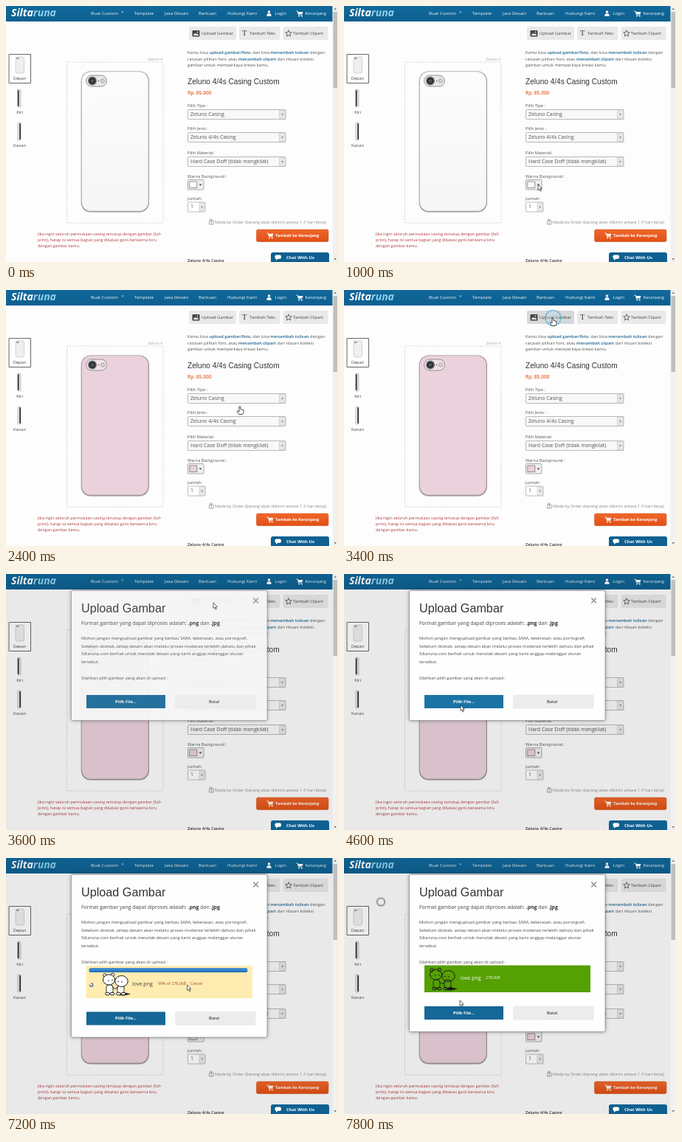
These frames come from a looping animation (450 by 347 pixels, 8000 ms). An HTML page with a canvas:

```html
<!DOCTYPE html>
<html lang="id">
<head>
<meta charset="utf-8">
<title>Casing Custom</title>
<style>
html, body { margin: 0; width: 100%; height: 100%; overflow: hidden; background: #fdfdfd; }
canvas { display: block; width: 450px; height: 347px; }
</style>
</head>
<body>
<canvas id="stage"></canvas>
<script>
const W = 450, H = 347, LOOP = 8000, STEP = 200;
const SANS = '"Open Sans", sans-serif', ARIAL = '"Liberation Sans", Arial, sans-serif';
const canvas = document.getElementById('stage');
const c = canvas.getContext('2d');
const dpr = window.devicePixelRatio || 1;
canvas.width = W * dpr;
canvas.height = H * dpr;

const PINK = '#ead1dc';
const PALETTE = [
  '000 444 666 999 ccc eee f3f3f3 fff',
  'f02020 ff9933 ffbf33 35a835 3cb4c4 4585d8 6a48b0 9a48bc',
  'f4cccc fce5cd fff2cc d9ead3 d0e0e3 cfe2f3 d9d2e9 ead1dc',
  'ea9999 f9cb9c ffe599 b6d7a8 a2c4c9 9fc5e8 b4a7d6 d5a6bd',
  'e06666 f6b26b ffd966 93c47d 76a5af 6fa8dc 8e7cc3 c27ba0',
  'cc0000 e69138 f1c232 6aa84f 45818e 3d85c6 674ea7 a64d79',
  '990000 b45f06 bf9000 38761d 134f5c 0b5394 351c75 741b47',
  '660000 783f04 7f6000 274e13 0c343d 073763 20124d 4c1130'
].map(row => row.split(' ').map(hex => '#' + hex));

// Pointer path: time, x, y of the tip
const PATH = [
  [200, 330, 300], [1000, 263, 242], [1400, 263, 242], [2000, 317, 158], [2400, 317, 158],
  [3200, 283, 38], [3400, 283, 38], [3600, 281, 39], [3800, 270, 60], [4600, 158, 178],
  [6599, 158, 178], [6600, 268, 165], [7000, 262, 168], [7800, 157, 193]
];

function text(str, x, y, size, color = '#444', weight = 400, opt = {}) {
  c.font = `${opt.style || ''} ${weight} ${size}px ${opt.family || SANS}`;
  c.textAlign = opt.align || 'left';
  c.textBaseline = 'middle';
  c.fillStyle = color;
  c.fillText(str, x, y);
  return x + c.measureText(str).width;
}

// Runs of [string, color, weight] set one after another
function runs(parts, x, y, size) {
  for (const [str, color, weight] of parts) x = text(str, x, y, size, color, weight);
}

function box(x, y, w, h, fill, stroke, r = 0, line = 0.8) {
  c.beginPath();
  c.roundRect(x, y, w, h, r);
  if (fill) { c.fillStyle = fill; c.fill(); }
  if (stroke) { c.strokeStyle = stroke; c.lineWidth = line; c.stroke(); }
}

function disc(x, y, r, fill, stroke, line = 0.8) {
  c.beginPath();
  c.arc(x, y, r, 0, 7);
  if (fill) { c.fillStyle = fill; c.fill(); }
  if (stroke) { c.strokeStyle = stroke; c.lineWidth = line; c.stroke(); }
}

function poly(points, fill, stroke, line = 0.8, close = true) {
  c.beginPath();
  points.forEach(([x, y]) => c.lineTo(x, y));
  if (close) c.closePath();
  if (fill) { c.fillStyle = fill; c.fill(); }
  if (stroke) { c.strokeStyle = stroke; c.lineWidth = line; c.stroke(); }
}

function at(x, y, draw) {
  c.save();
  c.translate(x, y);
  draw();
  c.restore();
}

function gradient(y0, y1, top, bottom) {
  const g = c.createLinearGradient(0, y0, 0, y1);
  g.addColorStop(0, top);
  g.addColorStop(1, bottom);
  return g;
}

const caret = (x, y, s, color) => poly([[x - s, y - s / 2], [x + s, y - s / 2], [x, y + s * 0.8]], color);

function cart(x, y) {
  at(x, y, () => {
    poly([[-4.5, -3.5], [-2.8, -3.5], [-1.5, 1.5], [3.5, 1.5]], null, '#fff', 0.9, false);
    poly([[-2.2, -2.5], [4.5, -2.5], [3.5, 0.5], [-1.6, 0.5]], '#fff');
    disc(-0.8, 3.2, 0.9, '#fff');
    disc(2.8, 3.2, 0.9, '#fff');
  });
}

function navBar() {
  box(0, 0, W, 21, gradient(0, 21, '#11699b', '#0d5f8f'));
  const x = text('Silta', 7, 10.5, 14, '#fff', 700, { style: 'italic' });
  text('runa', x, 10.5, 14, '#8fd0ee', 700, { style: 'italic' });
  const items = [['Buat Custom', 115], ['Template', 174], ['Jasa Desain', 215], ['Bantuan', 261],
    ['Hubungi Kami', 300], ['Login', 364.5], ['Keranjang', 405.5]];
  for (const [label, left] of items) text(label, left, 10.3, 6.1, '#f2f8fb');
  caret(158, 8.5, 1.8, '#7db4d2');
  disc(356.5, 8, 1.8, '#fff');
  box(353.5, 10.2, 6, 3.6, '#fff', null, [2, 2, 0, 0]);
  cart(398, 10.5);
}

function scrollBar() {
  box(442.5, 0, 7.5, H, '#f1f1f1');
  box(443.5, 8, 5.5, 103, '#bfbfbf');
  poly([[444.5, 5], [448, 5], [446.2, 2.5]], '#777');
  poly([[444.5, 342], [448, 342], [446.2, 344.5]], '#777');
}

function tools(hover) {
  box(248, 28, 64, 18, hover ? '#d6d8da' : '#e9e9e9', null, 2);
  box(316, 28, 55.5, 18, '#e9e9e9', null, 2);
  box(375.5, 28, 61, 18, '#e9e9e9', null, 2);
  box(252.5, 33, 10, 8.5, '#444', null, 1);
  poly([[253.8, 40], [256.5, 36.5], [258.3, 38.5], [259.6, 37.2], [261.3, 40]], '#eee');
  disc(259.5, 35.3, 0.9, '#eee');
  text('T', 320, 37.5, 10.5, '#333', 400, { family: '"Liberation Serif", serif' });
  const star = Array.from({ length: 10 }, (_, i) => {
    const a = i * Math.PI / 5 - Math.PI / 2, r = i % 2 ? 2 : 4.5;
    return [383 + r * Math.cos(a), 37.3 + r * Math.sin(a)];
  });
  poly(star, null, '#444', 0.8);
  text('Upload Gambar', 265, 37.3, 5.8);
  text('Tambah Teks', 330, 37.3, 5.8);
  text('Tambah Clipart', 389, 37.3, 5.8);
}

function sideViews() {
  box(4, 65.5, 29.5, 39, '#fff', '#666', 0, 1);
  box(13, 69, 11.5, 22, '#efefef', '#c4c4c4', 2, 0.7);
  box(14, 70, 3.6, 1.8, '#888', null, 0.9);
  text('Depan', 18.5, 99, 5.7, '#444', 400, { align: 'center' });
  for (const [y, label] of [[113, 'Kiri'], [158, 'Kanan']]) {
    box(15.8, y, 4.2, 24, '#e6e6e6', '#aaa', 1.2, 0.6);
    box(label === 'Kiri' ? 15.8 : 18.2, y + 1, 1.8, 22, '#333', null, 0.8);
    text(label, 18.5, y + 32, 5.7, '#444', 400, { align: 'center' });
  }
}

function phoneCase(pink) {
  c.setLineDash([2, 1.5]);
  box(82.5, 76, 130.5, 218, null, '#c2c2c2', 0, 0.7);
  c.setLineDash([]);
  text('Zeluno 4', 212, 72.5, 4.8, '#aaa', 400, { align: 'right' });
  box(101.7, 88.5, 92.3, 191, '#8d8d8d', null, 13);
  box(102.4, 89, 90.8, 189.3, pink ? '#d3b8c4' : '#dedede', null, 12.5);
  box(103, 89.5, 89.3, 187.5, pink ? PINK : gradient(89, 278, '#fcfcfc', '#f6f6f6'), null, 12);
  box(108.5, 94, 28, 15, pink ? '#f0e2e8' : '#e8e8e8', '#8a8a8a', 7.5, 0.9);
  disc(117, 101.5, 6, '#777');
  disc(117, 101.5, 4.6, '#2b2d31');
  disc(117, 101.5, 2.2, '#4b5563');
  disc(125.5, 101.5, 0.8, '#555');
  disc(131, 101.5, 2.7, '#d8d3c8', '#8a8a8a', 0.6);
  ['Jika ingin seluruh permukaan casing tertutup dengan gambar (full-',
    'print), harap isi semua bagian yang dibatasi garis berwarna biru',
    'dengan gambar kamu.'
  ].forEach((line, i) => text(line, 43, 309.4 + i * 8, 5.45, '#b33a42'));
}

function select(label, value, y) {
  text(label, 246, y - 5, 5.7, '#555');
  box(246.5, y, 132.5, 13, '#f8f8f8', '#a8a8a8', 1);
  box(370.5, y + 0.5, 8, 12, '#e6e6e6', '#bbb', 0, 0.5);
  caret(374.5, y + 6.5, 1.5, '#777');
  text(value, 250, y + 6.5, 7, '#555');
}

function form(pink) {
  const link = '#1b6490';
  runs([['Kamu bisa ', '#555', 400], ['upload gambar/foto', link, 600], [', dan bisa ', '#555', 400],
    ['menambah tulisan', link, 600], [' dengan', '#555', 400]], 246, 63.7, 5.75);
  runs([['ratusan pilihan font, atau ', '#555', 400], ['menambah clipart', link, 600],
    [' dari ribuan koleksi', '#555', 400]], 246, 72.3, 5.75);
  text('gambar untuk memperkaya kreasi kamu.', 246, 80.8, 5.75, '#555');
  text('Zeluno 4/4s Casing Custom', 246, 103, 10.1, '#333', 400, { family: ARIAL });
  text('Rp. 85.000', 246, 118, 6.6, '#e8622a', 600);
  select('Pilih Tipe :', 'Zeluno Casing', 140.5);
  select('Pilih Jenis :', 'Zeluno 4/4s Casing', 171.5);
  select('Pilih Material:', 'Hard Case Doff (tidak mengkilat)', 204.5);
  text('Warna Background :', 246, 231.4, 5.7, '#555');
  box(246.5, 235.5, 21.5, 13.5, '#efefef', '#999', 1);
  box(248.8, 238, 10, 8.5, pink ? PINK : '#fff', '#777', 0, 0.8);
  caret(263.5, 242.3, 1.8, '#333');
  text('Jumlah:', 246, 261.9, 5.7, '#555');
  box(246.5, 266, 23.5, 13, '#fff', '#aaa', 1);
  box(262, 266.5, 7.5, 12, '#e8e8e8', '#bbb', 0, 0.5);
  caret(265.75, 272.5, 1.5, '#777');
  text('1', 250, 272.5, 7, '#555');
  box(275.5, 291, 5.5, 5, null, '#888', 0, 0.7);
  poly([[278.2, 296], [278.2, 290.5], [276.2, 288.8], [278.2, 290.5], [280.2, 288.8]], null, '#888', 0.7, false);
  text('Made by Order (barang akan dikirim antara 1-3 hari kerja)', 283, 293.4, 5.65, '#888');
  box(339.5, 303, 97.5, 16.5, gradient(303, 320, '#f0672a', '#e04e14'), '#d4561f', 2, 0.6);
  cart(358, 311.3);
  text('Tambah ke Keranjang', 365, 311.5, 5.5, '#fff', 700);
  text('Zeluno 4/4s Casing', 246, 345.3, 5.5, '#333', 600);
}

function chatTab() {
  box(359, 334, 79, 16, '#0f6090', null, [3, 3, 0, 0]);
  box(364.5, 337.5, 8.5, 5.2, '#fff', null, 2);
  poly([[366, 342], [369, 342], [366, 345]], '#fff');
  text('Chat With Us', 380, 341, 5.85, '#fff', 700);
}

function picker() {
  box(246.5, 129, 80, 106.5, '#e3e3e3', '#c6c6c6', 0, 0.7);
  PALETTE.forEach((row, j) => row.forEach((color, i) => {
    box(251 + i * 8.86, 135 + j * 9.55, 7.8, 8.2, color, '#f2f2f2', 0, 0.5);
  }));
  poly([[314.5, 139], [316.5, 141.5], [319.5, 136.5]], null, '#111', 1.2, false);
  box(279, 211.5, 41.5, 9, '#d2d2d2', '#c0c0c0', 0, 0.5);
  text('warna lain  >', 283, 216, 5.9, '#444');
}

// Two small figures sitting side by side, the left one with ears
function doodle(x, y, fill) {
  const ink = '#1a1a1a';
  const head = (hx, hy, rx, ry) => {
    c.beginPath();
    c.ellipse(hx, hy, rx, ry, 0, 0, 7);
    if (fill) { c.fillStyle = fill; c.fill(); }
    c.strokeStyle = ink;
    c.lineWidth = 1;
    c.stroke();
  };
  at(x, y, () => {
    poly([[30, 26], [39, 28.5], [30, 30.5], [22, 30]], ink);
    for (const bx of [6, 21]) {
      box(bx, 16, 9, 12, fill, ink, 3.5, 0.9);
      head(bx + 1.5, 28, 3, 1.8);
      head(bx + 8, 28, 3, 1.8);
    }
    poly([[14, 19], [18, 21.5], [22, 19]], null, ink, 0.9, false);
    disc(4, 3, 2.3, fill, ink, 0.9);
    disc(14.5, 2.5, 2.3, fill, ink, 0.9);
    head(9.5, 9, 8, 7);
    head(26.5, 11, 8.7, 7.5);
    for (const [ex, ey] of [[9, 10], [14, 9.5], [22, 11.5], [27, 12]]) disc(ex, ey, 0.8, ink);
  });
}

function uploadRow(t) {
  if (t >= 7400) {
    box(109, 145.5, 225, 36.5, '#55a002');
    doodle(115, 149, null);
    text('love.png', 158, 163, 7, '#fff');
    text('278.0kB', 192, 163, 5.2, '#fff');
    return;
  }
  const pct = Math.min(99, 18 + Math.round((t - 6600) * 0.135));
  box(108.5, 146, 225.5, 44, '#feecb0');
  box(112.5, 149, 217 * pct / 100, 6, gradient(149, 155, '#4a95d6', '#1f6db8'), null, 2);
  c.beginPath();
  c.arc(115.5, 172, 2.2, t / 200, t / 200 + 5);
  c.strokeStyle = '#2a5d9a';
  c.lineWidth = 1.2;
  c.stroke();
  doodle(130, 156, '#fff');
  text('love.png', 171, 171, 7.1, '#444');
  text(pct + '% of 278.0kB', 206, 171, 5.3, '#a04a3a');
  text('Cancel', 250, 171, 5.3, '#a04a3a');
}

function modal(t) {
  const uploading = t >= 6600;
  const drop = !uploading ? 0 : t >= 7400 ? 37 : 44.5;
  const hover = t >= 4400 && !uploading;
  c.save();
  c.globalAlpha = t < 3800 ? 0.92 : 1;
  c.shadowColor = 'rgba(0,0,0,.45)';
  c.shadowBlur = 5 * dpr;
  box(88.5, 22.5, 265.5, 176 + drop, '#fefefe', null, 2);
  c.shadowColor = 'transparent';
  box(88.5, 22.5, 265.5, 176 + drop, null, '#8f8f8f', 2, 0.7);
  text('Upload Gambar', 102, 47.7, 16.2, '#333', 400, { family: ARIAL });
  poly([[335.3, 32.5], [342, 39.5]], null, '#999', 1.8, false);
  poly([[342, 32.5], [335.3, 39.5]], null, '#999', 1.8, false);
  runs([['Format gambar yang dapat diproses adalah: ', '#444', 400], ['.png', '#333', 700],
    [' dan ', '#444', 400], ['.jpg', '#333', 700]], 102, 67.2, 6.95);
  ['Mohon jangan mengupload gambar yang berbau SARA, kekerasan, atau pornografi.',
    'Sebelum dicetak, setiap desain akan melalui proses moderasi terlebih dahulu dan pihak',
    'Siltaruna.com berhak untuk menolak desain yang kami anggap melanggar aturan',
    'tersebut.'
  ].forEach((line, i) => text(line, 102, 87.2 + i * 10.8, 5.8, '#4a4a4a'));
  text('Silahkan pilih gambar yang akan di upload :', 102, 141, 5.8, '#4a4a4a');
  if (uploading) uploadRow(t);
  box(109, 164 + drop, 107, 18, hover ? '#1b73a4' : '#146796');
  text('Pilih File...', 162.5, 173.3 + drop, 5.7, '#fff', 700, { align: 'center' });
  box(229.5, 164 + drop, 108.5, 18, '#ececec', '#e2e2e2', 1, 0.5);
  text('Batal', 282, 173.3 + drop, 5.7, '#444', 600, { align: 'center' });
  c.restore();
}

function pointer(t) {
  if (t < PATH[0][0]) return;
  let i = PATH.findIndex(p => p[0] > t);
  if (i < 0) i = PATH.length;
  const [t0, x0, y0] = PATH[i - 1];
  const [t1, x1, y1] = PATH[i] || [t0 + 1, x0, y0];
  const u = (t - t0) / (t1 - t0), k = u * u * (3 - 2 * u);
  const hand = (t >= 1800 && t <= 2400) || (t >= 3200 && t < 3600);
  at(x0 + (x1 - x0) * k, y0 + (y1 - y0) * k, () => {
    if (t === 3400) {
      c.setLineDash([2.5, 1.2]);
      disc(0.5, 0, 10.5, 'rgba(170,220,240,.25)', '#3fa3cf', 1.4);
      c.setLineDash([]);
    }
    if (hand) {
      poly([[-1, 0], [0.7, 0], [1, 3.5], [5, 4.6], [5, 8], [3.8, 10.5], [-1.2, 10.5], [-4, 6.5], [-3, 5.6], [-1, 7]],
        '#fff', '#222', 0.8);
    } else {
      poly([[0, 0], [0, 7.5], [1.8, 6], [3.2, 9], [4.4, 8.4], [3.1, 5.5], [5.3, 5.3]], '#fff', '#222', 0.7);
    }
  });
}

function draw(t) {
  const pink = t >= 2400;
  c.setTransform(dpr, 0, 0, dpr, 0, 0);
  box(0, 0, W, H, '#fdfdfd');
  navBar();
  tools(t >= 3200 && t < 3600);
  sideViews();
  phoneCase(pink);
  form(pink);
  if (t >= 1200 && t < 2400) picker();
  if (t >= 7400) disc(50, 59.5, 5.2, null, '#aaa', 2.2);
  if (t >= 3600) box(0, 0, W, H, 'rgba(0,0,0,.08)');
  chatTab();
  scrollBar();
  if (t >= 3600) modal(t);
  pointer(t);
}

function frame() {
  let t = Math.floor(performance.now() % LOOP / STEP) * STEP;
  if (t > 4600 && t < 6600) t = 4600;
  draw(t);
  requestAnimationFrame(frame);
}
frame();
</script>
</body>
</html>
```
